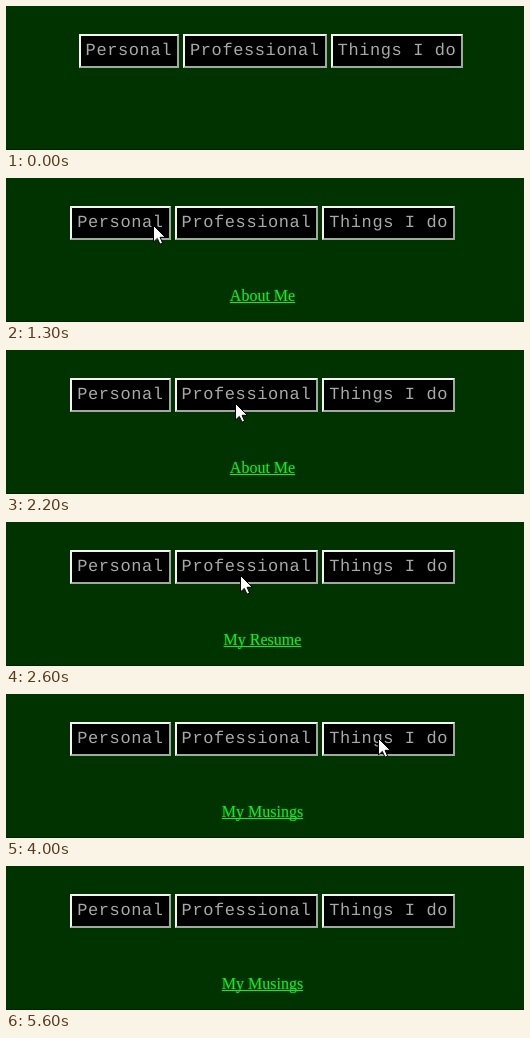
Recreate the animation shown at these times as an HTML page. Size 518x144 px, loop 5.9 s.

```html
<!DOCTYPE html>
<html lang="en">
<head>
<meta charset="utf-8">
<title>Button menu</title>
<style>
  html, body { margin: 0; width: 100%; height: 100%; overflow: hidden; background: #030; }
  #stage { position: absolute; left: 0; top: 0; width: 518px; height: 144px; overflow: hidden; background: #030; }
  #stage::after { content: ""; position: absolute; left: 0; bottom: 0; width: 100%; height: 1px; background: #002300; }
  #menu { position: absolute; left: 72.6px; top: 28px; display: flex; gap: 4px; }
  #menu.shifted { left: 64.2px; }
  .btn {
    flex: none; height: 34px; box-sizing: border-box; padding: 0 5px;
    border: 2px solid; border-color: #f4f4f4 #a2a8a2 #a2a8a2 #f4f4f4;
    background: #000; color: #a8a8a8; white-space: pre;
    font: 17px/31px "Liberation Mono", "Courier New", monospace;
    letter-spacing: .6px; text-rendering: geometricPrecision;
  }
  .btn.down { border-color: #a2a8a2 #f4f4f4 #f4f4f4 #a2a8a2; }
  #link {
    position: absolute; left: 0; top: 109px; width: 513px; text-align: center;
    font: 16px/18px "Liberation Serif", "Times New Roman", serif;
    color: #0cee1e; -webkit-text-stroke: .2px;
    text-decoration: underline; text-decoration-skip-ink: none;
  }
  #cursor { position: absolute; left: 0; top: 0; width: 14px; height: 22px; overflow: visible; }
</style>
</head>
<body>
<div id="stage">
  <div id="menu"></div>
  <div id="link"></div>
  <svg id="cursor" viewBox="0 0 14 22">
    <path d="M.5 .5V17L4.3 13.4L7 19.2L9.6 18.1L7.1 12.3H12.3Z" fill="#fff" stroke="#000"/>
  </svg>
</div>
<script>
  const LOOP = 5900, STEP = 100, CHAR = 10.8, FRAME = 14;
  const [menu, link, cursor] = ['menu', 'link', 'cursor'].map(id => document.getElementById(id));

  const items = [
    { label: 'Personal', page: 'About Me', down: 1200, up: 1300 },
    { label: 'Professional', page: 'My Resume', down: 2400, up: 2500 },
    { label: 'Things I do', page: 'My Musings', down: 3200, up: 3400 }
  ];
  for (const item of items) {
    item.el = document.createElement('div');
    item.el.className = 'btn';
    item.el.textContent = item.label;
    item.el.style.width = item.label.length * CHAR + FRAME + 'px';
    menu.append(item.el);
  }

  // The pointer eases from stop to stop.
  const stops = [
    { at: 0, x: 106, y: 146 },
    { at: 800, x: 147, y: 49 },
    { at: 1300, x: 147, y: 47 },
    { at: 1800, x: 182, y: 51 },
    { at: 2300, x: 234, y: 53 },
    { at: 2600, x: 234, y: 53 },
    { at: 3200, x: 373, y: 47 },
    { at: 3500, x: 373, y: 47 },
    { at: 4800, x: 369, y: 37 },
    { at: 5200, x: 367, y: -24 }
  ];
  const ease = k => k * k * (3 - 2 * k);
  const mix = (a, b, k) => Math.round(a + (b - a) * k);

  function pointer(t) {
    const i = stops.findIndex(s => s.at > t);
    if (i < 0) return stops[stops.length - 1];
    const a = stops[i - 1], b = stops[i];
    const k = ease((t - a.at) / (b.at - a.at));
    return { x: mix(a.x, b.x, k), y: mix(a.y, b.y, k) };
  }

  function draw(t) {
    let page = '';
    for (const { el, page: target, down, up } of items) {
      el.classList.toggle('down', t >= down && t < up);
      if (t >= up) page = target;
    }
    // The first page brings a scrollbar, which moves the centred menu left.
    menu.classList.toggle('shifted', page !== '');
    link.textContent = page;
    const { x, y } = pointer(t);
    cursor.style.transform = `translate(${x}px, ${y}px)`;
  }

  const start = performance.now();
  let last = -1;
  function tick() {
    const t = Math.floor((performance.now() - start) % LOOP / STEP) * STEP;
    if (t !== last) draw(last = t);
    requestAnimationFrame(tick);
  }
  tick();
</script>
</body>
</html>
```
